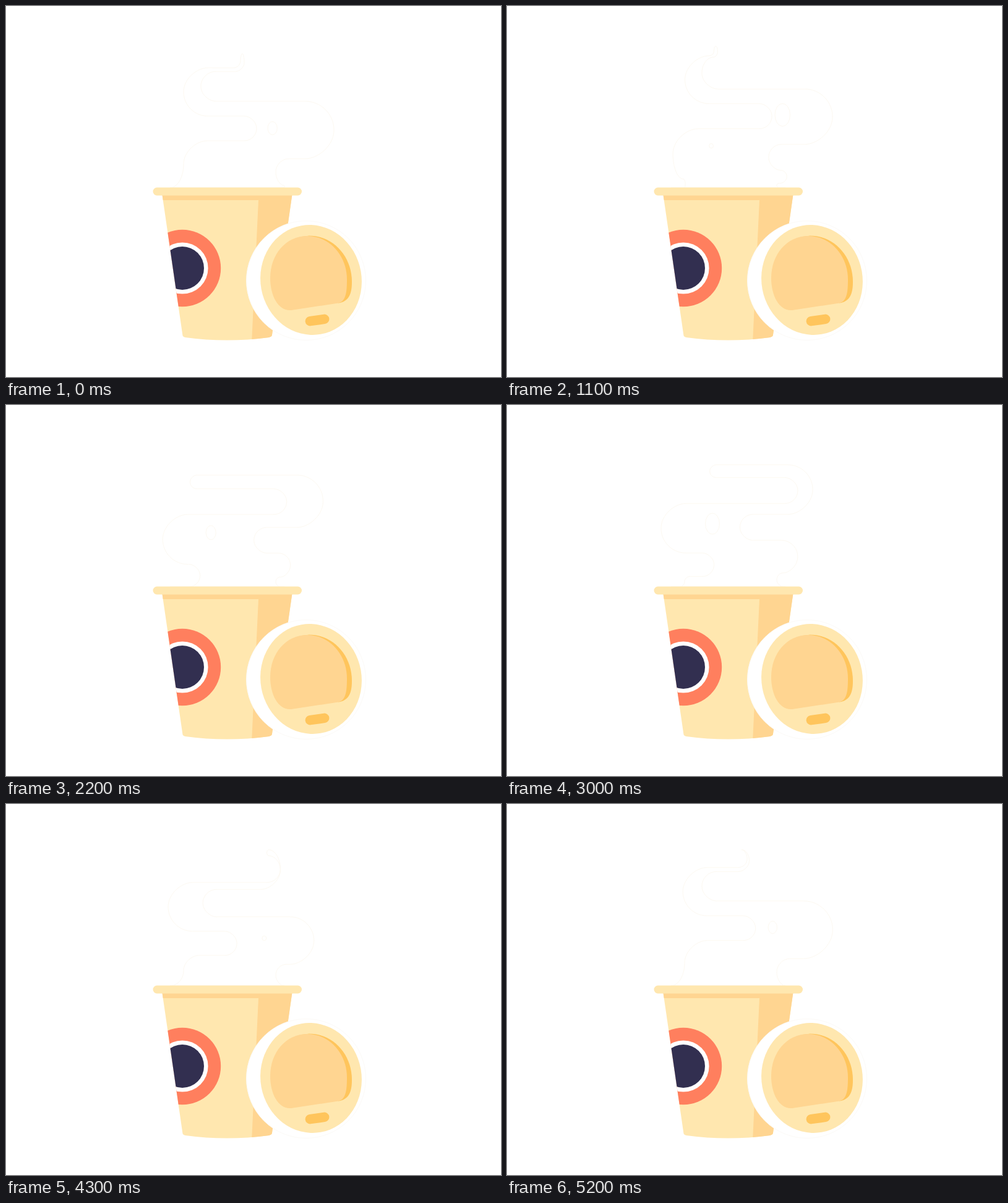
Write an HTML page that moves like this. It is 800 px wide and 600 px high and loops after 5.3 s.

```html
<!DOCTYPE html>
<html lang="en">
<head>
<meta charset="utf-8">
<title>Steaming cup</title>
<style>
  html, body { margin: 0; width: 100%; height: 100%; overflow: hidden; background: #fff; }
  svg { display: block; width: 100vw; height: 100vh; }
  .steam { fill: #fff; stroke: #fdf9f1; }
  .cream { fill: #ffe7af; }
  .shade { fill: #ffd591; }
  .amber { fill: #ffc55c; }
</style>
</head>
<body>
<svg viewBox="0 0 800 600">
  <defs>
    <clipPath id="body"><path d="M251.700 300L285.500 533Q286 535 290 536Q357 545 425 536Q429 535 429.800 533L463.200 300Z"/></clipPath>
  </defs>
  <path id="steam" class="steam"/>
  <ellipse class="steam hole"/>
  <ellipse class="steam hole"/>

  <g clip-path="url(#body)">
    <rect class="cream" x="240" y="300" width="230" height="245"/>
    <path class="shade" d="M240 300H470V545H397L408 314H240Z"/>
    <circle cx="285" cy="424" r="62.200" fill="#ff7f5e"/>
    <circle cx="285" cy="424" r="41.600" fill="#fff"/>
    <circle cx="285" cy="424" r="35" fill="#322f50"/>
  </g>
  <rect class="cream" x="237.500" y="293.500" width="240.500" height="13" rx="6.500"/>

  <circle cx="485" cy="444" r="96.500" fill="#fff" stroke="#fcfaf7"/>
  <ellipse class="cream" cx="493" cy="443" rx="81.700" ry="89.200" transform="rotate(-10 493 443)"/>
  <path class="amber" d="M478 373L490 371.500C528 371.500 559 404 559 446C559 464 555 478 537 480.500Z"/>
  <path class="shade" d="M427 440C427 402 452 372 487 372C524 372 551 405 551 442C551 460 550 478 537 480.500L461 492C441 494 427 470 427 440Z"/>
  <rect class="amber" x="483.500" y="500.200" width="39" height="15.600" rx="7.800" transform="rotate(-8 503 508)"/>
</svg>
<script>
const LOOP = 5300, STEP = 100, BASE = 294, CURL_END = 2000;
const { abs, cos, max, min, PI, sign, sin } = Math;
const mix = (a, b, u) => a + (b - a) * u;

// Side extremes and rows of a fold by its age, in loops since it left the cup.
const leftBulge = a => 287 - (a < 1 ? 0 : a < 2 ? 38 * sin(PI * (a - 1)) : 70 * (cos(4.6 * (a - 2) ** 2) - 1));
const leftNotch = a => min(265 + 140 * a, 470 - 360 * max(0, a - 1.5) ** 2);
const rightBulge = a => a < 1 ? 450 + 80 * a * a : 530 - 145 * (a - 1) ** 2;
const rightNotch = a => {
  const u = max(0, a - 1);
  return max(315, 436 - 60 * u - 120 * u * u);
};
const leftHigh = a => 336 - 118 * a;
const leftLow = a => 422 - 122 * a;
const rightHigh = a => 290 - 150 * a + 14 * a * a;
const rightLow = a => min(BASE - 45 * a, 388 - 141 * a);

function steamPath(t) {
  const phase = t / LOOP, age = phase - .07 * sin(PI * phase);
  const curl = t < CURL_END;
  const ceiling = curl ? 77 - .011 * t : max(74, rightHigh(age + 1));
  const xs = [265], rows = [BASE];
  const add = (x, row) => { xs.push(x); rows.push(min(BASE, max(ceiling, row))); };

  for (let a = age; a < age + 2; a++) {
    add(leftBulge(a), leftHigh(a));
    add(leftNotch(a), leftLow(a + 1));
  }
  add(leftBulge(age + 2), leftHigh(age + 2));
  if (curl) {
    const tip = 382 - 270 * age;
    add(tip - 3, ceiling);
    add(tip, ceiling);
    add(tip + 3, rightLow(age + 2));
    add(rightNotch(age + 2), rightHigh(age + 1));
  }
  add(rightBulge(age + 1), rightLow(age + 1));
  add(rightNotch(age + 1), rightHigh(age));
  add(rightBulge(age), rightLow(age));
  add(rightNotch(age), BASE);
  xs.push(450);
  return roundedPath(xs, rows);
}

// Horizontal rows joined by rounded turns that touch each x.
function roundedPath(xs, rows) {
  const mid = i => i && i < rows.length ? (rows[i - 1] + rows[i]) / 2 : BASE;
  let d = `M${xs[0]} ${BASE}`;
  rows.forEach((row, i) => {
    const x0 = xs[i], x1 = xs[i + 1], y0 = mid(i), y1 = mid(i + 1);
    const r0 = abs(row - y0), r1 = abs(row - y1);
    const fit = min(1, abs(x1 - x0) / (r0 + r1 || 1)) * sign(x1 - x0);
    const a = x0 + r0 * fit, b = x1 - r1 * fit;
    d += `C${x0} ${mix(y0, row, .55)} ${mix(a, x0, .45)} ${row} ${a} ${row}L${b} ${row}`
       + `C${mix(b, x1, .55)} ${row} ${x1} ${mix(row, y1, .45)} ${x1} ${y1}`;
  });
  return d + 'Z';
}

const steam = document.getElementById('steam');
const holes = [...document.querySelectorAll('.hole')];
const drifts = [
  { born: 1000, x: 330, y: 228, vx: .001, vy: -.018 },
  { born: 4200, x: 416, y: 219, vx: .0133, vy: -.0195 }
];

function draw(now) {
  const t = Math.floor((now % LOOP) / STEP) * STEP;
  steam.setAttribute('d', steamPath(t));
  drifts.forEach((h, i) => {
    const age = (t - h.born + LOOP) % LOOP;
    const shape = { cx: h.x + h.vx * age, cy: h.y + h.vy * age, rx: 3 + .0042 * age, ry: 3 + .007 * age };
    for (const name in shape) holes[i].setAttribute(name, shape[name]);
    holes[i].style.display = age < 2700 ? '' : 'none';
  });
}

const start = performance.now();
function tick() {
  draw(performance.now() - start);
  requestAnimationFrame(tick);
}
tick();
</script>
</body>
</html>
```
